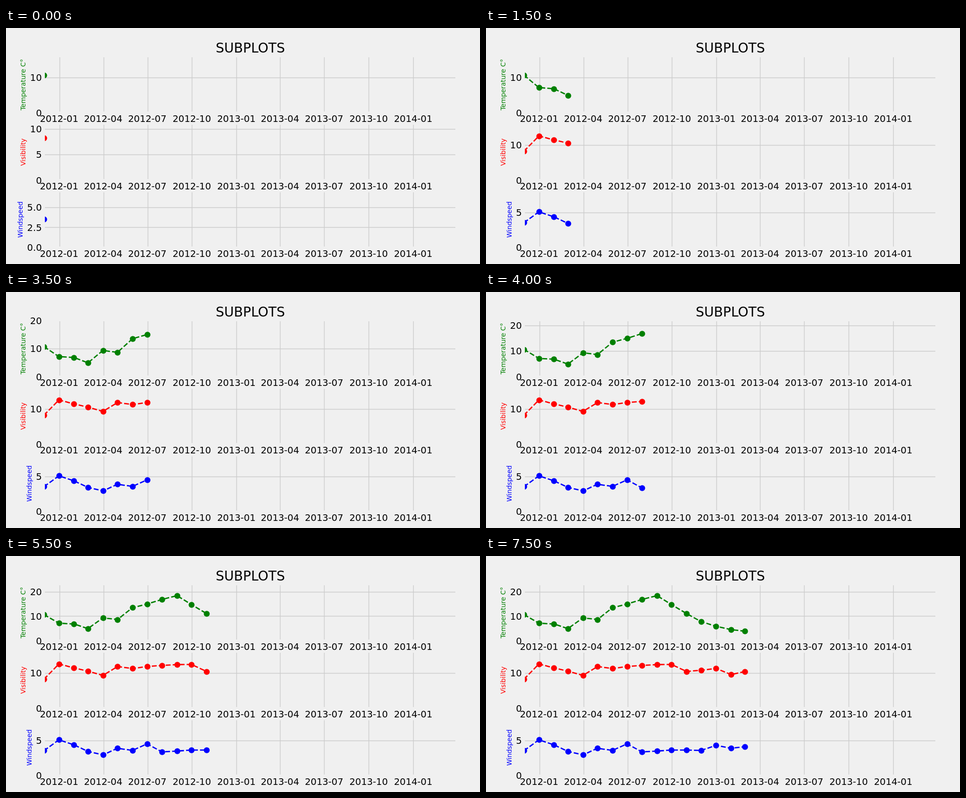
Recreate the animation shown at these times as an HTML page with a canvas. Size 1000 by 500 pixels, loop 8 s.

```html
<!DOCTYPE html>
<html lang="en">
<head>
<meta charset="utf-8">
<title>Subplots</title>
<style>
  html, body { margin: 0; width: 100%; height: 100%; overflow: hidden; background: #f0f0f0; }
  canvas { display: block; }
</style>
</head>
<body>
<canvas id="chart" width="1000" height="500"></canvas>
<script>
const ctx = document.getElementById('chart').getContext('2d');
const STEP = 500, LOOP = 8000;
const LEFT = 80, WIDTH = 870, HEIGHT = 119.118, PITCH = 142.93, FIRST_BOTTOM = 179.12, BORDER = 2.08;
const DAY = 864e5, START = Date.UTC(2011, 10, 30), SPAN = 852;

const plots = [
  { label: 'Temperature C°', color: '#008000', headroom: 5,
    values: [10.63, 7.1, 6.78, 4.88, 9.29, 8.6, 13.45, 14.93, 16.82, 18.37, 14.7, 11.03, 7.75, 5.84, 4.47, 3.83] },
  { label: 'Visibility', color: '#ff0000', headroom: 3,
    values: [8.18, 12.53, 11.42, 10.48, 9.28, 11.8, 11.25, 11.8, 12.13, 12.36, 12.38, 10.4, 10.75, 11.25, 9.52, 10.38] },
  { label: 'Windspeed', color: '#0000ff', headroom: 3,
    values: [3.53, 5.07, 4.36, 3.42, 2.93, 3.87, 3.56, 4.5, 3.35, 3.47, 3.62, 3.62, 3.56, 4.28, 3.87, 4.09] }
];

const dateX = time => LEFT + (time - START) / DAY / SPAN * WIDTH;
const monthEndX = i => dateX(Date.UTC(2011, 11 + i, 0));
const snap = v => Math.floor(v + 0.5) + 0.5;
const quarters = Array.from({ length: 9 }, (_, i) => {
  const time = Date.UTC(2012, i * 3, 1);
  return { x: dateX(time), text: new Date(time).toISOString().slice(0, 7) };
});

function text(string, x, y, size, align, color = '#000') {
  ctx.font = `${size}px "DejaVu Sans", sans-serif`;
  ctx.textAlign = align;
  ctx.fillStyle = color;
  ctx.fillText(string, x, y);
}

function line(points, color, width, dash = []) {
  ctx.strokeStyle = color;
  ctx.lineWidth = width;
  ctx.setLineDash(dash);
  ctx.beginPath();
  points.forEach(([x, y]) => ctx.lineTo(x, y));
  ctx.stroke();
}

function tickStep(limit) {
  return limit < 8 ? 2.5 : limit < 14 ? 5 : limit < 15 ? 5 : 10;
}

function drawPlot({ label, color, headroom, values }, index, count) {
  const shown = values.slice(0, count);
  const bottom = FIRST_BOTTOM + index * PITCH, top = bottom - HEIGHT;
  const limit = Math.round(Math.max(...shown)) + headroom;
  const valueY = v => bottom - v / limit * HEIGHT;
  const step = tickStep(limit), decimals = step % 1 ? 1 : 0;
  const ticks = [];
  for (let v = 0; v <= limit; v += step) ticks.push(v);

  ctx.save();
  ctx.beginPath();
  ctx.rect(LEFT + BORDER, top + BORDER, WIDTH - 2 * BORDER, HEIGHT - 2 * BORDER);
  ctx.clip();
  for (const { x } of quarters) line([[snap(x), top], [snap(x), bottom]], '#cbcbcb', 1.39);
  for (const v of ticks) {
    const y = snap(valueY(v));
    line([[LEFT, y], [LEFT + WIDTH, y]], '#cbcbcb', 1.39);
  }
  const points = shown.map((v, i) => [monthEndX(i), valueY(v)]);
  line(points, color, 2.78, [10.28, 4.44]);
  ctx.fillStyle = color;
  for (const [x, y] of points) {
    ctx.beginPath();
    ctx.arc(snap(x), snap(y), 6.25, 0, 2 * Math.PI);
    ctx.fill();
  }
  ctx.restore();

  for (const { x, text: month } of quarters)
    text(month, Math.round(x - 0.5), Math.round(bottom + 20), 19.44, 'center');
  for (const v of ticks)
    text(v.toFixed(decimals), 75.5, Math.round(valueY(v) + 7.5), 19.44, 'right');

  // The axis label moves aside for wider tick labels.
  const labelX = decimals ? 35 : limit < 10 ? 54 : 41;
  ctx.save();
  ctx.translate(labelX, (top + bottom) / 2 + 0.5);
  ctx.rotate(-Math.PI / 2);
  text(label, 0, 0, 13.89, 'center', color);
  ctx.restore();
}

function frame(now) {
  const count = Math.floor(now % LOOP / STEP) + 1;
  ctx.fillStyle = '#f0f0f0';
  ctx.fillRect(0, 0, 1000, 500);
  text('SUBPLOTS', 515.5, 52, 28, 'center');
  plots.forEach((plot, i) => drawPlot(plot, i, count));
  requestAnimationFrame(frame);
}
requestAnimationFrame(frame);
</script>
</body>
</html>
```
